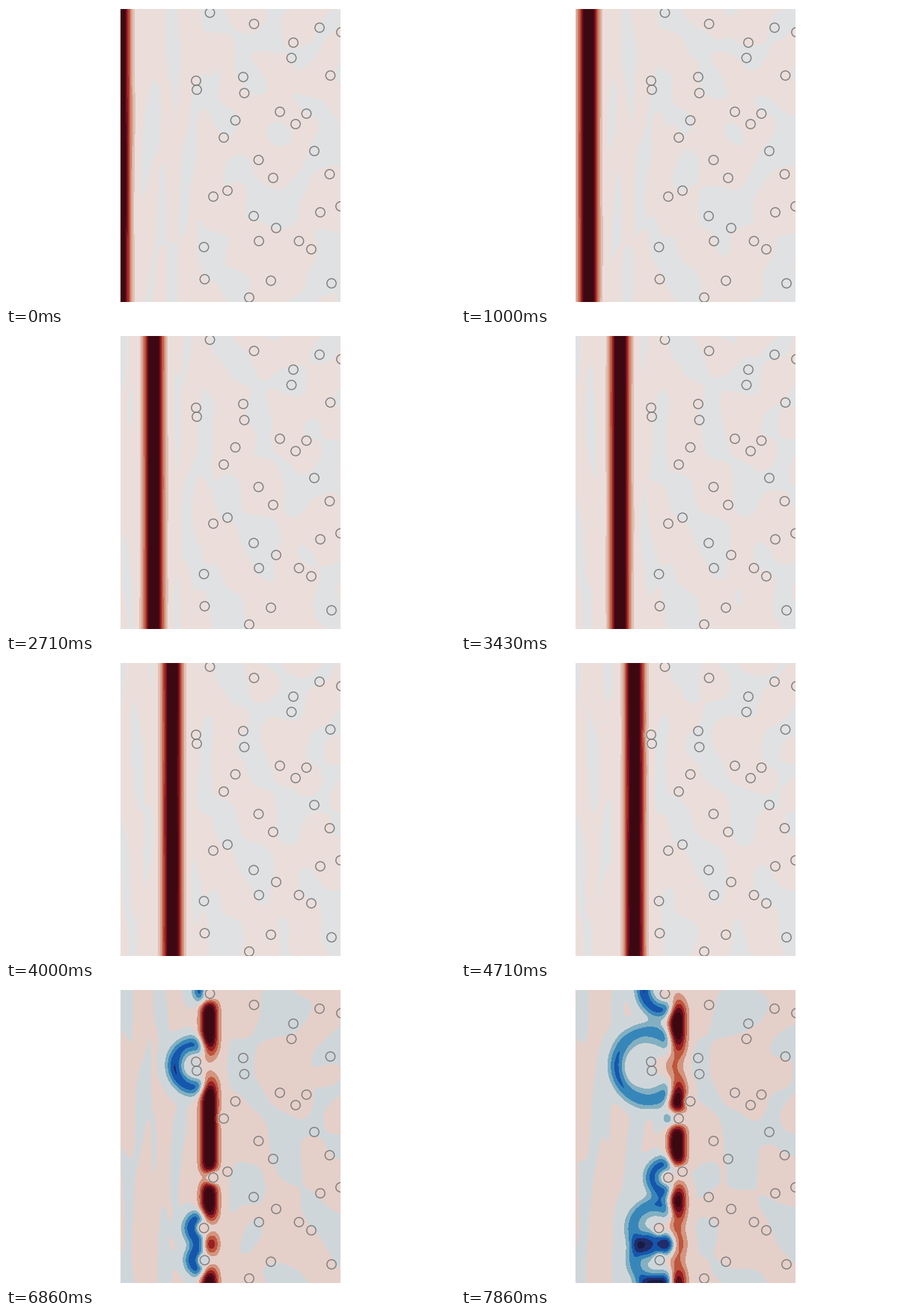
Recreate the animation shown at these times as a matplotlib script. Size 600 by 400 pixels, loop 8000 ms.

```python
import numpy as np
import matplotlib.pyplot as plt
from matplotlib.animation import FuncAnimation
from matplotlib.colors import LinearSegmentedColormap
from matplotlib.patches import Circle

FRAMES = 56
LEFT, RIGHT, TOP, BOTTOM = 153, 447, 4, 396
PAD = 70                   # hidden margin where the pulse starts
START, SPEED = 153, 2.47   # pulse centre and pixels per frame
PEAK, SIGMA = 1.3, 8.1
SUBSTEPS = 4
RADIUS = 6.2

# Rod centres, scattered by hand
RODS = [
    (272.5, 9), (331.5, 24), (419, 29), (448, 35), (384, 49), (381.5, 69.5),
    (254, 100), (255, 112), (317, 95), (318.5, 116.5), (433.5, 93),
    (366, 141.5), (401.5, 144), (387, 158), (306.5, 153), (291, 176),
    (412, 194), (337.5, 206), (432.5, 225), (357, 230), (296, 247),
    (277, 255), (447, 268), (420, 276), (331, 281), (361, 297), (338, 314.5),
    (391.5, 314.5), (408, 325.5), (264.5, 322.5), (265.5, 365.5),
    (354, 367.5), (435, 371), (325, 390),
]

# Cold and warm halves meet in a near-white centre
COLD = ["#171c42", "#293a8f", "#0b66bd", "#4590b9", "#8eb5c2", "#d2d8db"]
WARM = ["#e6d2cc", "#d59d89", "#c46548", "#ac2b24", "#780e28", "#3c0911"]
stops = np.insert(np.linspace(0, 1, 12), 6, 0.5)
cmap = LinearSegmentedColormap.from_list(
    "balance", list(zip(stops, COLD + ["#f1eceb"] + WARM)), N=512)

x = np.arange(LEFT, RIGHT + 1.0)
y = np.arange(TOP, BOTTOM + 1.0)


def simulate():
    """2-D wave equation: a plane pulse meeting rods held at zero."""
    gx, gy = np.meshgrid(np.arange(LEFT - PAD, RIGHT + 1.0), y)
    free = np.ones_like(gx)
    for cx, cy in RODS:
        free[np.hypot(gx - cx, gy - cy) < RADIUS + 0.6] = 0

    def pulse(centre):
        return PEAK * np.exp(-0.5 * ((gx - centre) / SIGMA) ** 2) * free

    step = SPEED / SUBSTEPS
    old, now = pulse(START - step), pulse(START)
    states = [now[:, PAD:]]
    for _ in range(FRAMES - 1):
        for _ in range(SUBSTEPS):
            p = np.pad(now, 1, mode="edge")
            lap = (p[2:, 1:-1] + p[:-2, 1:-1] + p[1:-1, 2:] + p[1:-1, :-2]
                   - 4 * now)
            old, now = now, (2 * now - old + step ** 2 * lap) * free
        states.append(now[:, PAD:])
    return states


rng = np.random.default_rng(7)


def ripple(wave_x, wave_y, count=50):
    """Random drifting sine modes within the given wavelength ranges."""
    kx = 2 * np.pi / rng.uniform(*wave_x, count)
    ky = 2 * np.pi / rng.uniform(*wave_y, count) * rng.choice([-1, 1], count)
    phase = rng.uniform(0, 2 * np.pi, count)
    drift = rng.uniform(-0.1, 0.1, count)
    ex = np.exp(1j * np.outer(kx, x))
    ey = np.exp(1j * np.outer(y, ky))

    def at(n):
        turn = np.exp(1j * (phase + drift * n))
        return ((ey * turn) @ ex).real * np.sqrt(2 / count)

    return at


streaks = ripple((22, 60), (150, 450))
blotches = ripple((50, 220), (50, 220))
blend = np.clip((x - 220) / 90, 0, 1)


def faint(n):
    """Tiny residue around zero: streaks on the left, blotches on the right."""
    return 0.008 * (0.3 + (1 - blend) * streaks(n) + blend * blotches(n))


waves = simulate()

fig = plt.figure(figsize=(6, 4), dpi=100, facecolor="white")
ax = fig.add_axes([LEFT / 600, 1 - BOTTOM / 400,
                   (RIGHT - LEFT) / 600, (BOTTOM - TOP) / 400])
ax.set_axis_off()
for rod in RODS:
    ax.add_patch(Circle(rod, RADIUS, fill=False, ec="#7d7d7d", lw=1, zorder=3))

shown = []


def draw(n):
    while shown:
        shown.pop().remove()
    # Coarser bands once the reflections widen the value range
    step = 0.1 if np.ptp(waves[n]) < 1.75 else 0.2
    levels = np.arange(-round(2 / step), round(2 / step) + 1) * step
    shown.append(ax.contourf(x, y, waves[n] + faint(n), levels=levels,
                             cmap=cmap, vmin=-1, vmax=1, extend="both",
                             zorder=1))
    ax.set_xlim(LEFT, RIGHT)
    ax.set_ylim(BOTTOM, TOP)
    return shown


anim = FuncAnimation(fig, draw, frames=FRAMES, init_func=lambda: draw(0),
                     interval=8000 / FRAMES, repeat=True, blit=False)
plt.show()
```
